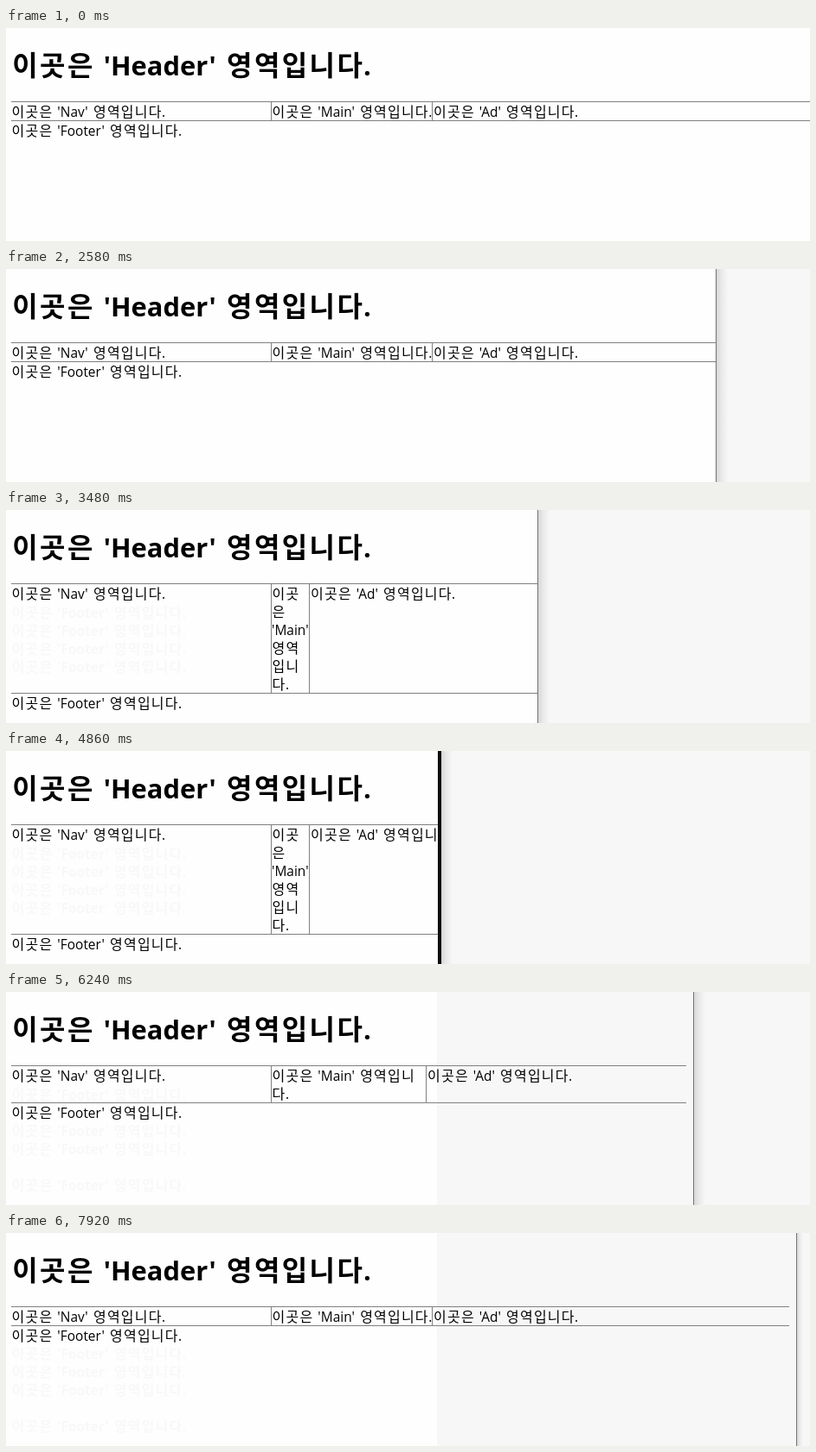
An HTML page with a canvas that plays this animation: 929x247 px, repeating every 8040 ms.

```html
<!DOCTYPE html>
<html lang="ko">
<head>
<meta charset="utf-8">
<title>Layout resize</title>
<style>
  html, body { margin: 0; width: 100%; height: 100%; overflow: hidden; background: #fefefe; }
  canvas { display: block; }
</style>
</head>
<body>
<canvas id="stage" width="929" height="247"></canvas>
<script>
const W = 929, H = 247, LOOP = 8040, STEP = 60;
const PAGE = '#fefefe', DESK = '#f7f7f7', RULE = '#808080', GHOST = '#f8f8f8';
const LEFT = 6, TOP = 85, LINE = 21, NAV_END = 306;
const MAIN_MIN = 350, MAIN_MAX = 492, AD_WIDTH = 301, AD_TEXT_END = 522;
const STOPPED = 3960;
const ctx = document.getElementById('stage').getContext('2d', { alpha: false });

// Window edge: [time, x]
const EDGE = [
  [1980, 935], [2040, 927], [2820, 773], [3000, 737], [3480, 614], [3660, 552],
  [3960, 490], [4800, 490], [5400, 581], [5640, 628], [6240, 794], [6480, 848],
  [6960, 905], [7140, 905], [7440, 913]
];

// Unbreakable pieces of the main text with their nominal widths
const UNITS = [
  ['이', 16], ['곳', 16], ['은', 16], [' ', 5.4], ["'Main'", 42.5], [' ', 5.4],
  ['영', 16], ['역', 16], ['입', 16], ['니', 16], ['다.', 20]
];

const clamp = (v, lo, hi) => Math.min(hi, Math.max(lo, v));

function edgeAt(t) {
  if (t < 2040) return W + 20;
  for (let i = 1; i < EDGE.length; i++) {
    const [t0, x0] = EDGE[i - 1], [t1, x1] = EDGE[i];
    if (t <= t1) return Math.round(x0 + (x1 - x0) * (t - t0) / (t1 - t0));
  }
  return 913;
}

function isThick(t) {
  return (t >= 2880 && t < 3300) || (t >= 4860 && t < 5820) || (t >= 6540 && t < 7920);
}

function wrapMain(width) {
  const lines = [''];
  let used = 0;
  for (const [text, w] of UNITS) {
    if (text !== ' ' && used && used + w > width + 1) {
      lines.push('');
      used = 0;
    }
    if (text === ' ' && !used) continue;
    lines[lines.length - 1] += text;
    used += w;
  }
  return lines;
}

function rect(x, y, w, h, color) {
  ctx.fillStyle = color;
  ctx.fillRect(x, y, w, h);
}

// Hangul is tracked out to a nearly full em; spaces are a third of an em
function text(str, x, y, size = 16, weight = 400, color = '#000') {
  const tracking = size * 0.075;
  ctx.fillStyle = color;
  for (const run of str.match(/[가-힣]+| |[^가-힣 ]+/g)) {
    if (run === ' ') {
      x += size * 0.35;
      continue;
    }
    const hangul = /[가-힣]/.test(run);
    ctx.font = hangul
      ? `${weight} ${size}px "Noto Sans CJK KR", "Noto Sans CJK", sans-serif`
      : `${weight} ${size * 0.965}px "Open Sans", "Noto Sans", sans-serif`;
    ctx.letterSpacing = hangul ? `${tracking}px` : '0px';
    ctx.fillText(run, hangul ? x + tracking / 2 : x, y);
    x += ctx.measureText(run).width;
  }
}

const area = name => `이곳은 '${name}' 영역입니다.`;
const footer = (rows, color, weight) =>
  text(area('Footer'), LEFT, TOP + 40 + LINE * (rows - 1), 16, weight, color);

function drawPage(t, edge) {
  const right = Math.max(AD_TEXT_END, t < STOPPED ? edge - 1 : edge - 8);
  const end = t < STOPPED ? edge : right;
  const mainEnd = clamp(right - AD_WIDTH, MAIN_MIN, MAIN_MAX);
  const lines = wrapMain(mainEnd - NAV_END - 1);
  const rows = lines.length;
  const bottom = TOP + 1 + rows * LINE;
  const base = TOP + 18;

  // Faint residue of earlier footer positions
  const seen = t < STOPPED ? rows : 6;
  for (const n of [1, 2, 3, 4, 6]) {
    if (n <= seen && n !== rows) footer(n, GHOST, 700);
  }

  text(area('Header'), LEFT, 55, 32, 700);
  rect(LEFT, TOP, end - LEFT, 1, RULE);
  rect(LEFT, bottom, end - LEFT, 1, RULE);
  rect(NAV_END, TOP, 1, bottom - TOP, RULE);
  rect(mainEnd, TOP, 1, bottom - TOP, RULE);
  text(area('Nav'), LEFT, base);
  lines.forEach((line, i) => text(line, NAV_END + 1, base + i * LINE));
  text(area('Ad'), mainEnd + 1.5, base);
  footer(rows);
}

function drawEdge(t, edge) {
  const thick = isThick(t);
  const x = edge + (thick ? 4 : 1);
  const resting = (t >= STOPPED && t < 4860) || t >= 7920;
  if (t < 6540 || resting) {
    const reach = resting ? 7 : 13;
    const shade = ctx.createLinearGradient(x, 0, x + reach, 0);
    shade.addColorStop(0, '#d6d6d6');
    shade.addColorStop(0.4, '#e8e8e8');
    shade.addColorStop(1, DESK);
    rect(x, 0, reach, H, shade);
  }
  rect(edge, 0, x - edge, H, thick ? '#0a0a0a' : '#747474');
}

function draw(t) {
  const edge = edgeAt(t);
  rect(0, 0, W, H, DESK);
  // The uncovered strip keeps the desktop tone after the window has shrunk
  rect(0, 0, t < STOPPED ? edge : Math.min(edge, 498), H, PAGE);
  ctx.save();
  ctx.beginPath();
  ctx.rect(0, 0, edge, H);
  ctx.clip();
  drawPage(t, edge);
  ctx.restore();
  if (t >= 2040) drawEdge(t, edge);
}

const start = performance.now();
function tick() {
  const t = (performance.now() - start) % LOOP;
  draw(Math.floor(t / STEP) * STEP);
  requestAnimationFrame(tick);
}
tick();
</script>
</body>
</html>
```
